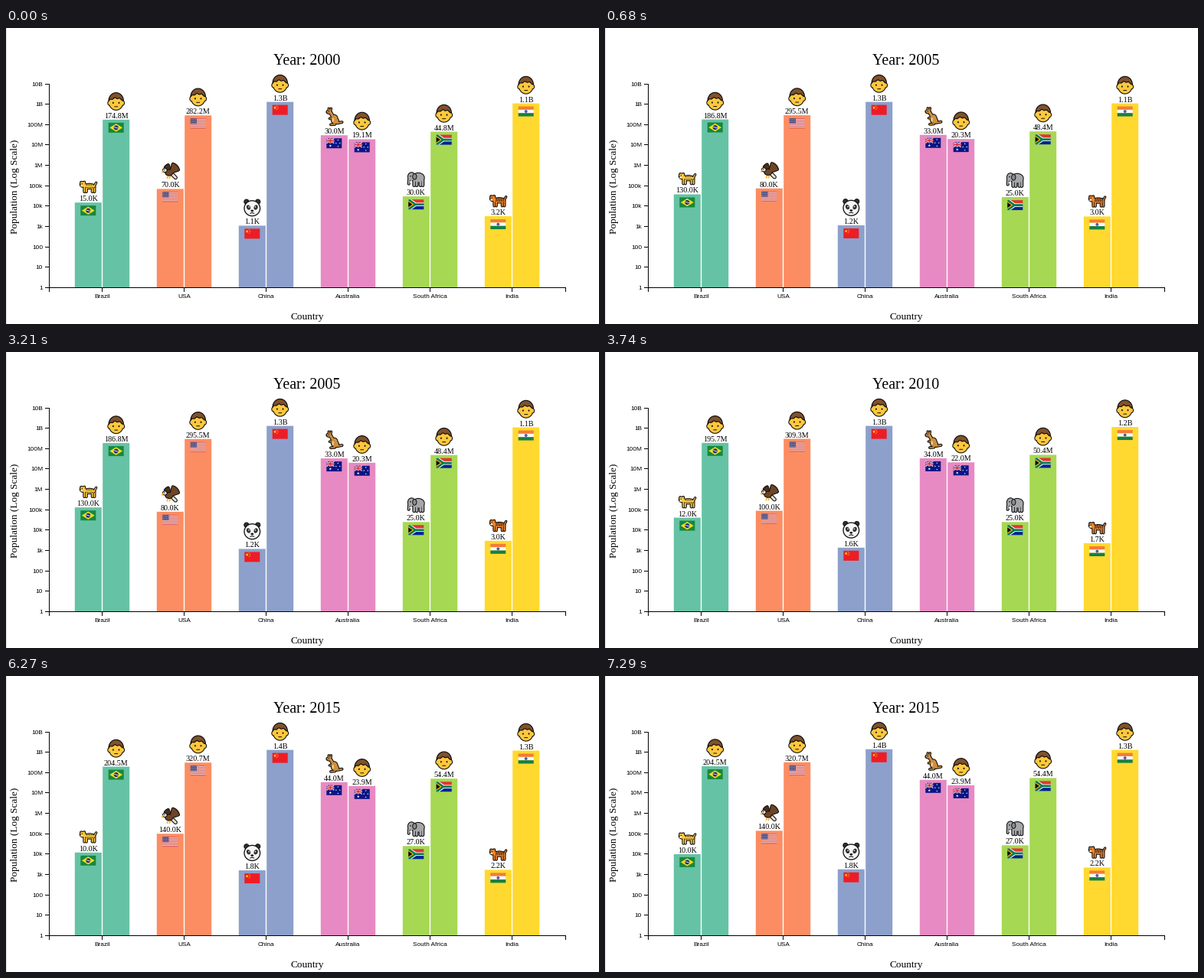
Animation, 774 px wide and 387 px high, one loop 8000 ms. Source, as a matplotlib script:

```python
import numpy as np
import matplotlib.pyplot as plt
from matplotlib.animation import FuncAnimation
from matplotlib.collections import LineCollection, PatchCollection
from matplotlib.patches import Ellipse, PathPatch, Polygon, Rectangle
from matplotlib.path import Path
from matplotlib.transforms import Affine2D

W, H = 774, 387
STEP_MS, LOOP_MS = 50, 8000
FIRST_YEAR, YEAR_STEP = 2000, 5
FIRST_MS, HOLD_MS, EASE_MS, CHANGES = 200, 3030, 1000, 3
BASE, DECADE = 339.5, 26.65
BAND, BAR_W, PAIR = 107, 35, 36.4
SERIF, SANS = "Liberation Serif", "Liberation Sans"
INK = "#101010"
UNITS = {"K": 3, "M": 6, "B": 9}


# ---------- shape helpers (y points down) ----------
def poly(xy, fc, lw=0):
    return Polygon(np.reshape(xy, (-1, 2)), fc=fc, ec=INK if lw else "none", lw=lw)


def line(x0, y0, x1, y1, color=INK, lw=1.0):
    return PathPatch(Path([(x0, y0), (x1, y1)]), fill=False, ec=color, lw=lw)


def oval(x, y, w, h, fc, lw=0, angle=0):
    return Ellipse((x, y), w, h, angle=angle, fc=fc, ec=INK if lw else "none", lw=lw)


def dot(x, y, d, fc=INK):
    return oval(x, y, d, d, fc)


def box(x, y, w, h, fc):
    return Rectangle((x, y), w, h, fc=fc, ec="none", lw=0)


def star(x, y, r, fc):
    a = np.arange(10) * np.pi / 5
    rad = np.where(np.arange(10) % 2, 0.42 * r, r)
    return poly(np.c_[x + rad * np.sin(a), y - rad * np.cos(a)], fc)


def fuse(fc, ovals=(), limbs=()):
    """Merge ovals (x, y, w, h) and limbs (x0, y0, x1, y1, width) in one outline."""
    parts = []
    for color, grow in ((INK, 2.2), (fc, 0)):
        parts += [line(*p, color, w + grow) for *p, w in limbs]
        parts += [oval(x, y, w + grow, h + grow, color) for x, y, w, h in ovals]
    return parts


def legs(xs, top, bottom, width):
    return [(x, top, x, bottom, width) for x in xs]


# ---------- icons, centred on the origin ----------
def person():
    skin, hair = "#ffc83d", "#80512c"
    a = np.linspace(-np.pi, 0, 24)
    x = np.linspace(9.4, -9.4, 24)
    crown = np.c_[9.6 * np.cos(a), -1 + 10.4 * np.sin(a)]
    fringe = np.c_[x, -1 - 3.4 * (1 - (x / 9.4) ** 2) + 0.7 * np.sin(x)]
    parts = fuse(skin, [(0, 0.6, 17.8, 20.4), (-8.6, 2, 3.4, 5), (8.6, 2, 3.4, 5)])
    parts.append(poly(np.vstack([crown, fringe]), hair, 1.2))
    parts += [oval(s * 3.8, 1.8, 1.9, 2.3, INK) for s in (-1, 1)]
    return parts + [line(-2, 6.8, 2, 6.8)]


def cat(coat):
    return fuse(coat,
                [(-7, -3.2, 6.8, 6.6), (1.5, -0.8, 15, 6.2),
                 (-9.2, -6, 1.6, 1.6), (-5, -6.2, 1.6, 1.6)],
                legs((-5, -2.4, 5.4, 8.2), 0, 6.4, 1.8) + [(8.4, -2, 10.4, -5.4, 1.2)]
                ) + [oval(-8.8, -1.6, 3, 2.2, "#fff3d6"), dot(-8, -4, 1.4), dot(-10, -2.6, 1.3)]


def leopard():
    return cat("#ffc83d") + [dot(-3 + 1.35 * i, -0.9 + 1.7 * (-1) ** i, 1.5) for i in range(9)]


def tiger():
    return cat("#f5842a") + [line(x, -3.6, x - 0.6, 0.6) for x in np.arange(-2, 8, 2.3)]


def eagle():
    brown, gold = "#6f4526", "#ffb02e"
    far = [(0, 0, 8 * np.cos(a), 9 * np.sin(a), 2) for a in np.linspace(-2.5, -1.9, 4)]
    near = [(1, 1, 1 + 10 * np.cos(a), 1 + 11 * np.sin(a), 2.4)
            for a in np.linspace(-1.3, -0.3, 6)]
    return (fuse("#4e2f1a", limbs=far)
            + [line(x, 4, x - 2, 9, gold, 1.6) for x in (-2, 1)]
            + fuse("#e8e0d2", limbs=[(3, 4, 7, 8, 3)])
            + fuse(brown, [(-1.5, 1.4, 9, 7)], near)
            + fuse("#f4f0e8", [(-7, -1.6, 4.6, 4)])
            + [line(-9.6, -0.6, -10.4, 1, gold, 1.8), dot(-7.4, -2, 1.4)])


def panda():
    black = "#303030"
    parts = [oval(s * 7.4, -7.8, 6.2, 6.2, black, 1) for s in (-1, 1)]
    parts.append(oval(0, 0.8, 20.6, 20, "#f6f6f6", 1.3))
    for s in (-1, 1):
        parts += [oval(s * 4.8, -0.4, 5, 6.6, black, angle=25 * s), dot(s * 4.2, -1, 1.6, "white"),
                  line(0, 6.6, s * 2.6, 7.4)]
    return parts + [oval(0, 4, 3.8, 2.6, INK)]


def kangaroo():
    return fuse("#cf8f3d",
                [(-6.8, -6, 6, 4.2), (0.4, 3.6, 8, 11), (2, 6, 7.4, 7)],
                [(-6.4, -7.5, -7, -10.4, 1.4), (-4.6, -7.5, -4, -10.4, 1.4),
                 (-4.6, -5, -0.6, 2, 3.2), (1, 10.2, -4.4, 10.6, 1.6),
                 (4, 8.6, 10.2, 7.4, 1.8), (-2, 1.6, -6, 2.6, 1.2)]
                ) + [dot(-7, -6.4, 1.4), dot(-9.6, -5.4, 1.4), oval(-1.4, 4.4, 2.4, 5.4, "#f0c88a")]


def elephant():
    return fuse("#a5a7a9",
                [(-6, -3.4, 8.6, 10), (2.8, -2, 15, 11.6)],
                legs((-2.6, 0.8, 5.6, 8.6), 0, 8, 2.6) + [(-9, -2, -9.6, 6, 2)]
                ) + [oval(-2, -3.4, 5.2, 7.6, "#8b8e91", 1), dot(-7.4, -4, 1.6),
                     line(-6.4, 2, -7.6, 4, "white", 1.5)]


# ---------- flags: 20 x 13, hung 4 px below the bar top ----------
def stripes(colors):
    h = 13 / len(colors)
    return [box(-10, 4 + i * h, 20, h, c) for i, c in enumerate(colors)]


def brazil():
    return [box(-10, 4, 20, 13, "#16883c"),
            poly([-8.4, 10.5, 0, 5.3, 8.4, 10.5, 0, 15.7], "#f4dc1c"),
            dot(0, 10.5, 6, "#1f2f7c"), line(-2.4, 9.8, 2.4, 11.2, "white", 0.8)]


def usa():
    red, pale = "#cf5560", "#f1dfe0"
    return stripes(([red, pale] * 7)[:13]) + [box(-10, 4, 8.2, 7, "#4b4a7c")] + [
        dot(-8.8 + 1.9 * c, 5.2 + 1.6 * r, 0.8, "#d5d5e6") for r in range(4) for c in range(4)]


def china():
    arc = np.linspace(-0.9, 0.9, 4)
    return [box(-10, 4, 20, 13, "#ee1c25"), star(-6.6, 7.6, 2.2, "#ffde00")] + [
        dot(-6.6 + 4 * np.cos(a), 7.6 + 3 * np.sin(a), 1, "#ffde00") for a in arc]


def australia():
    parts = [box(-10, 4, 20, 13, "#0a1584")]
    for color, thin, thick in (("white", 1.4, 2.4), ("#dc2436", 0.5, 1.3)):
        parts += [line(-9.5, 7.25 - s * 3, -0.5, 7.25 + s * 3, color, thin) for s in (-1, 1)]
        parts += [box(-5 - thick / 2, 4, thick, 6.5, color),
                  box(-10, 7.25 - thick / 2, 10, thick, color)]
    around = np.arange(4) * np.pi / 2
    return parts + [star(-5, 13.8, 1.8, "white")] + [
        star(5 + 2.5 * np.cos(a), 10.4 + 4.2 * np.sin(a), 1.1, "white") for a in around]


def south_africa():
    def wye(edge, mid, half, fc):
        upper = np.array([(-10, -6.5), (edge, -6.5), (mid, -half), (10, -half)])
        both = np.vstack([upper, upper[::-1] * (1, -1)])
        return poly(both + (0, 10.5), fc)

    def wedge(tip, half, fc):
        return poly([-10, 10.5 - half, tip, 10.5, -10, 10.5 + half], fc)

    return stripes(["#de3831", "#002395"]) + [
        wye(-6, 0, 2.3, "white"), wye(-7.6, -0.6, 1.4, "#007a4d"),
        wedge(-3, 4.9, "#ffb612"), wedge(-5, 3.5, "black")]


def india():
    return stripes(["#f47b36", "#fafafa", "#138045"]) + [
        dot(0, 10.5, 3.6, "#2b2b8c"), dot(0, 10.5, 1.6, "#9c9cd0")]


# name, colour, flag, animal, animal centre above the bar, animal and people labels
COUNTRIES = [
    ("Brazil", "#66c2a5", brazil, leopard, 20.5,
     "15.0K 130.0K 12.0K 10.0K", "174.8M 186.8M 195.7M 204.5M"),
    ("USA", "#fc8d62", usa, eagle, 22.8,
     "70.0K 80.0K 100.0K 140.0K", "282.2M 295.5M 309.3M 320.7M"),
    ("China", "#8da0cb", china, panda, 23.5,
     "1.1K 1.2K 1.6K 1.8K", "1.3B 1.3B 1.3B 1.4B"),
    ("Australia", "#e78ac3", australia, kangaroo, 24.5,
     "30.0M 33.0M 34.0M 44.0M", "19.1M 20.3M 22.0M 23.9M"),
    ("South Africa", "#a6d854", south_africa, elephant, 22.5,
     "30.0K 25.0K 25.0K 27.0K", "44.8M 48.4M 50.4M 54.4M"),
    ("India", "#ffd92f", india, tiger, 20,
     "3.2K 3.0K 1.7K 2.2K", "1.1B 1.1B 1.2B 1.3B"),
]


def top_of(text):
    return BASE - DECADE * (np.log10(float(text[:-1])) + UNITS[text[-1]])


def ease(t):
    t = min(max(t, 0), 1)
    return 4 * t ** 3 if t < 0.5 else 1 - 4 * (1 - t) ** 3


# ---------- stage ----------
fig = plt.figure(figsize=(W / 72, H / 72), dpi=72, facecolor="white")
ax = fig.add_axes([0, 0, 1, 1])
ax.set(xlim=(0, W), ylim=(H, 0))
ax.axis("off")


def label(x, y, s, size, font=SERIF, ha="center", va="baseline", **kw):
    return ax.text(x, y, s, fontsize=size, family=font, ha=ha, va=va,
                   color="black", zorder=5, **kw)


def rules(segments, color):
    art = LineCollection(segments, colors=color, linewidths=1, zorder=4)
    art.set_snap(False)
    ax.add_collection(art, autolim=False)


class Bar:
    def __init__(self, x, texts, color, flag, icon, lift):
        self.cx, self.texts = x + BAR_W / 2, texts.split()
        self.tops = [top_of(s) for s in self.texts]
        self.rect = ax.add_patch(Rectangle((x, 0), BAR_W, 0, fc=color, lw=0, snap=False))
        self.text = label(self.cx, 0, "", 10.1)
        self.parts = []
        for shapes, dy in ((flag(), 0), (icon(), -lift)):
            move = Affine2D()
            art = PatchCollection(shapes, match_original=True, zorder=3,
                                  capstyle="round", joinstyle="round")
            art.set_transform(move + ax.transData)
            art.set_snap(False)
            ax.add_collection(art, autolim=False)
            self.parts.append((move, dy))

    def place(self, k, f):
        a, b = self.tops[max(k - 1, 0)], self.tops[k]
        top = a + (b - a) * f
        self.rect.set_y(top)
        self.rect.set_height(BASE - top)
        self.text.set_text(self.texts[k])
        self.text.set_y(top - 2)
        for move, dy in self.parts:
            move.clear().translate(self.cx, top + dy)


bars = []
axes = [[(56.5, 73), (56.5, 345)], [(51, BASE), (731, BASE)], [(730.5, BASE), (730.5, 345)]]
for i, (name, color, flag, animal, lift, wild, people) in enumerate(COUNTRIES):
    x, mid = 89.8 + BAND * i, 125.5 + BAND * i
    bars.append(Bar(x, wild, color, flag, animal, lift))
    bars.append(Bar(x + PAIR, people, color, flag, person, 23.8))
    axes.append([(mid, BASE), (mid, 345)])
    label(mid, 353, name, 8.3, SANS)

for i, s in enumerate("1 10 100 1k 10k 100k 1M 10M 100M 1B 10B".split()):
    y = np.floor(BASE - DECADE * i) + 0.5
    axes.append([(51, y), (57, y)])
    label(48, y + 2.5, s, 8.3, SANS, ha="right")

rules(axes, "black")
rules([[(0.5, 0), (0.5, H)]], "#dedede")

title = label(393, 48, "", 20)
label(393.3, 381, "Country", 13.3)
label(18.5, 207, "Population (Log Scale)", 13.3, ha="right", va="center", rotation=90)


def draw(i):
    t = (i + 0.5) * STEP_MS - FIRST_MS
    k = min(max(int(t // HOLD_MS) + 1, 0), CHANGES)
    f = ease((t - (k - 1) * HOLD_MS) / EASE_MS) if k else 1
    title.set_text(f"Year: {FIRST_YEAR + YEAR_STEP * k}")
    for bar in bars:
        bar.place(k, f)
    return []


anim = FuncAnimation(fig, draw, frames=LOOP_MS // STEP_MS, interval=STEP_MS,
                     repeat=True, repeat_delay=0, blit=False)
plt.show()
```
